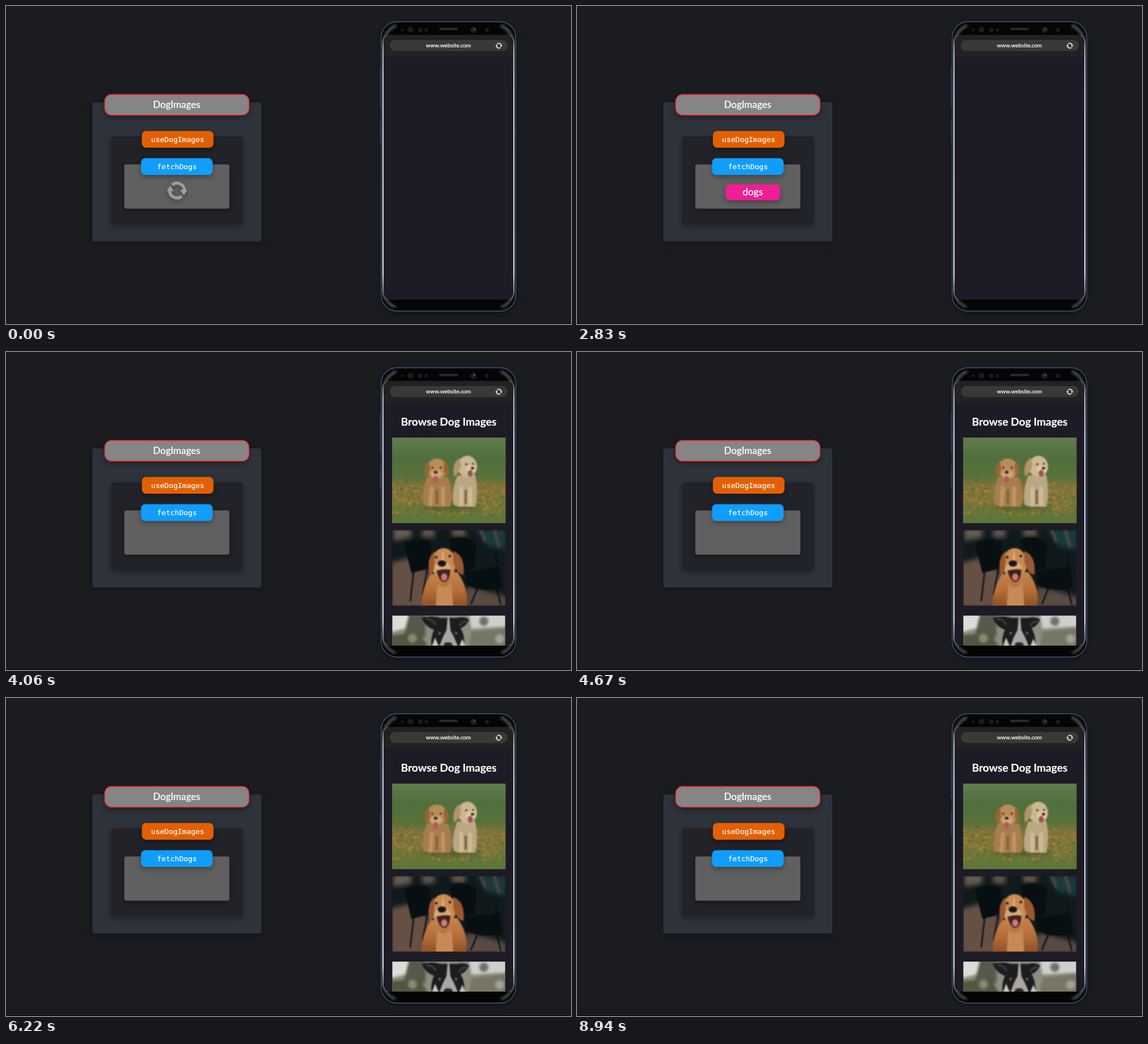
An HTML page for the animation above (9.16 s loop, 998x561 px).

```html
<!DOCTYPE html>
<html lang="en">
<head>
<meta charset="utf-8">
<title>Dog images data flow</title>
<style>
  html, body { margin: 0; width: 100%; height: 100%; overflow: hidden; background: #1b1c20; }
  svg { display: block; width: 998px; height: 561px; }
  text { fill: #fff; stroke: #fff; stroke-width: .2px; text-anchor: middle; font: 500 17px Lato, "Open Sans", sans-serif; }
  .code { font: 13px "DejaVu Sans Mono", monospace; }
  .shadow { filter: drop-shadow(0 4px 5px rgba(0, 0, 0, .3)); }
  .soft { filter: blur(1px); }
  .blurred { filter: blur(2px); }
  .hazy { filter: blur(4px); }
</style>
</head>
<body>
<svg viewBox="0 0 998 561">
  <defs>
    <g id="sync">
      <path d="M8.4 10A13 13 0 0 1-13 0M-8.4-10A13 13 0 0 1 13 0" fill="none" stroke="currentColor" stroke-width="5.4"/>
      <path d="M-18.5 1L-12-8.5L-5.5 1ZM18.5-1L12 8.5L5.5-1Z" fill="currentColor"/>
    </g>
    <linearGradient id="edge" x1="0" y1="52" x2="0" y2="520" gradientUnits="userSpaceOnUse">
      <stop offset="0" stop-color="#555"/>
      <stop offset=".06" stop-color="#b5b5b5"/>
      <stop offset=".2" stop-color="#d2d2d2"/>
      <stop offset=".9" stop-color="#ddd"/>
      <stop offset="1" stop-color="#444"/>
    </linearGradient>
    <linearGradient id="lawn" x2="0" y2="1">
      <stop stop-color="#617b4d"/>
      <stop offset=".25" stop-color="#506f3d"/>
      <stop offset=".45" stop-color="#58713a"/>
      <stop offset=".58" stop-color="#82743a"/>
      <stop offset=".75" stop-color="#75783b"/>
      <stop offset="1" stop-color="#5a7538"/>
    </linearGradient>
    <linearGradient id="coat" x2="0" y2="1">
      <stop stop-color="#c4854e"/>
      <stop offset=".5" stop-color="#b87039"/>
      <stop offset="1" stop-color="#8f4f28"/>
    </linearGradient>
    <clipPath id="screen"><rect x="667" y="51" width="229" height="467" rx="12"/></clipPath>
    <clipPath id="photo1"><rect x="682" y="151" width="200.500" height="151"/></clipPath>
    <clipPath id="photo2"><rect x="682.500" y="314.500" width="199.500" height="133"/></clipPath>
    <clipPath id="photo3"><rect x="682.500" y="465" width="199" height="60"/></clipPath>
  </defs>

  <rect width="998" height="561" fill="#1b1c20"/>
  <rect y="560" width="998" height="1" fill="#050505"/>

  <!-- Component diagram -->
  <rect class="shadow" x="152.500" y="170" width="298.500" height="245.500" rx="4" fill="#2d323b"/>
  <rect class="shadow" x="185.500" y="230" width="232.500" height="155" rx="5" fill="#212329"/>
  <rect class="shadow" x="209" y="279.500" width="185.500" height="78" rx="4" fill="#606060"/>
  <rect class="shadow" x="174.800" y="156.500" width="254" height="35.500" rx="11.500" fill="#858585" stroke="#ee4041" stroke-width="1.800"/>
  <text x="301.500" y="179.700">DogImages</text>
  <rect class="shadow" x="240" y="220.500" width="126.500" height="29.500" rx="7.500" fill="#e35f03"/>
  <text class="code" x="303.300" y="240">useDogImages</text>
  <rect class="shadow" x="238.500" y="268.500" width="126.500" height="29.500" rx="7.500" fill="#109dfb"/>
  <text class="code" x="302" y="288">fetchDogs</text>
  <g id="loader" class="shadow"><use id="spinner" href="#sync" color="#9d9d9d"/></g>

  <!-- Phone -->
  <path d="M661 107V178M661 200V241" stroke="#26334a" stroke-width="2.500"/>
  <rect class="shadow" x="662.800" y="27.700" width="237.600" height="510.600" rx="28" fill="#050506" stroke="#3f5785" stroke-width="1.400"/>
  <g fill="none" class="blurred">
    <path d="M667 68Q668 44 689 34M896 68Q895 44 874 34" stroke="#606060" stroke-width="4"/>
    <path d="M667 500Q668 524 688 531M896 500Q895 524 875 531" stroke="#707070" stroke-width="3"/>
  </g>
  <g fill="#1b1c1f">
    <circle cx="700" cy="42" r="2.500"/><circle cx="714.500" cy="41.500" r="5"/>
    <circle cx="732" cy="42" r="4"/><circle cx="742.500" cy="42" r="3"/>
    <circle cx="849.500" cy="42" r="3.500"/>
    <circle cx="826" cy="42" r="4.500" stroke="#333"/>
    <rect x="765" y="38.500" width="33.500" height="4" rx="2" fill="#2b2b2c"/>
  </g>
  <circle cx="827" cy="41" r="1.300" fill="#666"/>
  <path d="M674 52Q666 54 666 68V502Q666 515 674 519M889 52Q897 54 897 68V502Q897 515 889 519" fill="none" stroke="url(#edge)" stroke-width="2.600"/>
  <g clip-path="url(#screen)">
    <rect x="667" y="51" width="229" height="468" fill="#1d1b25"/>
    <rect x="667" y="51" width="229" height="38.500" fill="#222223"/>
    <rect x="678" y="60" width="208" height="19.500" rx="9.750" fill="#39393a"/>
    <text x="781.500" y="73.300" style="font-size:9.800px">www.website.com</text>
    <use href="#sync" color="#ddd" transform="translate(870.500 70) scale(.33)"/>

    <g id="page">
      <text x="782" y="129.500" style="font-size:19.200px;font-weight:700">Browse Dog Images</text>

      <g clip-path="url(#photo1)">
        <rect x="682" y="151" width="201" height="151" fill="url(#lawn)"/>
        <g id="flowers" class="soft"></g>
        <ellipse class="hazy" cx="784" cy="273" rx="52" ry="5" fill="#4c5b2b"/>
        <g class="soft">
          <path d="M744 220Q734 245 737 270L748 273H785Q791 250 780 221Z" fill="#a87d4d"/>
          <path d="M797 218Q786 248 791 270L800 273H829Q835 246 829 217Z" fill="#bba783"/>
          <path d="M752 240L750 269M772 240L772 269" stroke="#bd965f" stroke-width="7" stroke-linecap="round"/>
          <path d="M804 240L804 269M820 240L820 269" stroke="#cdbb94" stroke-width="7" stroke-linecap="round"/>
          <path d="M761 243L761 268M812 243L812 268" stroke="#80613f" stroke-width="4"/>
          <ellipse cx="761" cy="206" rx="18" ry="18" fill="#b98d57"/>
          <path d="M747 192Q736 201 741 221Q749 218 749 202ZM775 192Q785 202 781 220Q773 217 773 202Z" fill="#94663a"/>
          <ellipse cx="760" cy="215" rx="10" ry="7" fill="#cba97a"/>
          <ellipse cx="759" cy="225" rx="4.500" ry="6.500" fill="#b25a60"/>
          <ellipse cx="815" cy="202" rx="17" ry="19" fill="#cbb891"/>
          <path d="M801 187Q787 196 791 220Q802 214 804 199Z" fill="#b0946a"/>
          <ellipse cx="821" cy="207" rx="9" ry="7" fill="#dbcaa7"/>
          <ellipse cx="820" cy="214" rx="4.500" ry="6" fill="#a05054"/>
          <g fill="#33231c">
            <circle cx="753" cy="204" r="1.800"/><circle cx="768" cy="204" r="1.800"/><ellipse cx="759" cy="212" rx="3.500" ry="2.500"/>
            <circle cx="813" cy="198" r="1.800"/><circle cx="825" cy="197" r="1.600"/><ellipse cx="824" cy="205" rx="3" ry="2.300"/>
          </g>
        </g>
      </g>

      <g clip-path="url(#photo2)">
        <rect x="682" y="314" width="201" height="134" fill="#101a1c"/>
        <g class="hazy">
          <path d="M678 372L716 362L752 392L742 452H678Z" fill="#665044"/>
          <path d="M684 310H716V327L684 333Z" fill="#665b50"/>
          <path d="M735 312H757V327H735Z" fill="#635750"/>
          <path d="M788 312H812V325H788Z" fill="#6a5a4d"/>
          <path d="M830 312H885V350L850 342Z" fill="#173b3d"/>
          <path d="M803 424L820 414L885 432V452H798Z" fill="#594a43"/>
        </g>
        <path class="blurred" d="M862 312L871 344M838 312L847 335" stroke="#68483e" stroke-width="4"/>
        <g class="soft" fill="#080f12">
          <path d="M703 337Q728 325 749 335L754 380L716 390Z"/>
          <path d="M783 330Q815 321 830 338L828 382L798 389Z"/>
          <path d="M811 388L872 378L876 416Q840 425 812 410Z"/>
          <path d="M720 388L714 440M744 384L736 428M865 355L870 386M834 414L821 445M866 414L874 446" stroke="#080f12" stroke-width="2.500"/>
        </g>
        <g class="soft">
          <path d="M750 392Q733 423 734 449H813Q818 417 797 388Z" fill="url(#coat)"/>
          <path d="M762 408Q773 423 787 406L790 448H759Z" fill="#c58a56"/>
          <ellipse cx="773" cy="373" rx="22" ry="27" fill="#c88b54"/>
          <path d="M757 352Q742 362 748 396Q758 389 757 369ZM790 351Q812 360 808 393Q796 392 790 370Z" fill="#9c592f"/>
          <path d="M772 347L768 371H775Z" fill="#dbac76"/>
          <ellipse cx="771" cy="382" rx="15" ry="12" fill="#d5aa78"/>
          <path d="M760 386Q772 382 785 384Q784 404 774 406Q766 405 760 386Z" fill="#42201f"/>
          <ellipse cx="774" cy="397" rx="5.500" ry="6.500" fill="#c87a7c"/>
          <g fill="#181316">
            <ellipse cx="770" cy="373" rx="7.500" ry="5.500"/><circle cx="760" cy="362" r="2.200"/><circle cx="784" cy="360" r="2.200"/>
          </g>
        </g>
      </g>

      <g clip-path="url(#photo3)">
        <rect x="682" y="464" width="201" height="60" fill="#8c8d80"/>
        <g class="blurred">
          <path d="M680 463H711V486L680 494Z" fill="#dcddd7"/>
          <path d="M712 463H741V503H702Z" fill="#56594c"/>
          <path d="M680 500L730 494L748 525H680Z" fill="#54563f"/>
          <path d="M818 463H885V484L822 488Z" fill="#ced0cb"/>
          <path d="M822 494L885 487V525H817Z" fill="#777563"/>
          <circle cx="844" cy="475" r="8" fill="#6c7066"/><circle cx="872" cy="506" r="8" fill="#a4a295"/>
          <circle cx="718" cy="505" r="8" fill="#888974"/>
        </g>
        <g class="soft">
          <path d="M734 469Q752 464 767 469H797Q810 466 818 472Q813 484 803 487Q813 505 808 525H752Q749 505 756 490Q742 486 734 469Z" fill="#1d1c1f"/>
          <path d="M742 471Q753 471 759 481M814 475Q804 475 801 483" fill="none" stroke="#473f40" stroke-width="3"/>
          <path d="M780 467H783L785 491Q794 506 800 525H764Q770 504 778 491Z" fill="#aaa6a2"/>
          <path d="M750 525L758 504L767 525ZM798 525L806 506L814 525Z" fill="#c8c5bf"/>
          <circle cx="766" cy="496" r="2.200" fill="#80664d"/><circle cx="795" cy="496" r="2.200" fill="#80664d"/>
          <ellipse cx="781" cy="517" rx="8" ry="5" fill="#29272a"/>
        </g>
      </g>
    </g>
  </g>

  <g id="badge">
    <rect class="shadow" x="-48.500" y="-14" width="97" height="28" rx="8" fill="#ee1f96"/>
    <text y="5" style="font-size:17.300px">dogs</text>
  </g>
</svg>
<script>
  const LOOP = 9160;
  const $ = id => document.getElementById(id);
  const part = (t, from, to) => Math.min(1, Math.max(0, (t - from) / (to - from)));
  const ease = u => (1 - Math.cos(Math.PI * u)) / 2;

  let seed = 7;
  const rand = () => (seed = seed * 16807 % 2147483647) / 2147483647;

  function plant() {
    const shades = ['#c07a32', '#566c32', '#b5793a', '#6a7338', '#8a7a3a'];
    let out = '';
    for (let i = 0; i < 420; i++) {
      const x = 682 + rand() * 200, y = 224 + (rand() + rand()) * 34;
      const r = .7 + rand() * 1.5;
      out += `<ellipse cx="${x}" cy="${y}" rx="${r * 1.4}" ry="${r}" fill="${shades[i % 5]}"/>`;
    }
    $('flowers').innerHTML = out;
  }

  function draw(t) {
    $('spinner').setAttribute('transform', `translate(302 325.500) rotate(${720 * ease(part(t, 0, 2000))})`);
    $('loader').setAttribute('opacity', 1 - part(t, 2000, 2250));

    const move = ease(part(t, 2750, 3700));
    $('badge').setAttribute('transform', `translate(${302 + 480 * move} ${329.5 - 45 * move})`);
    $('badge').setAttribute('opacity', part(t, 2050, 2350) * (1 - part(t, 3700, 3950)));
    $('page').setAttribute('opacity', part(t, 3700, 4000));
  }

  plant();
  const start = performance.now();
  function tick() {
    draw((performance.now() - start) % LOOP);
    requestAnimationFrame(tick);
  }
  tick();
</script>
</body>
</html>
```
